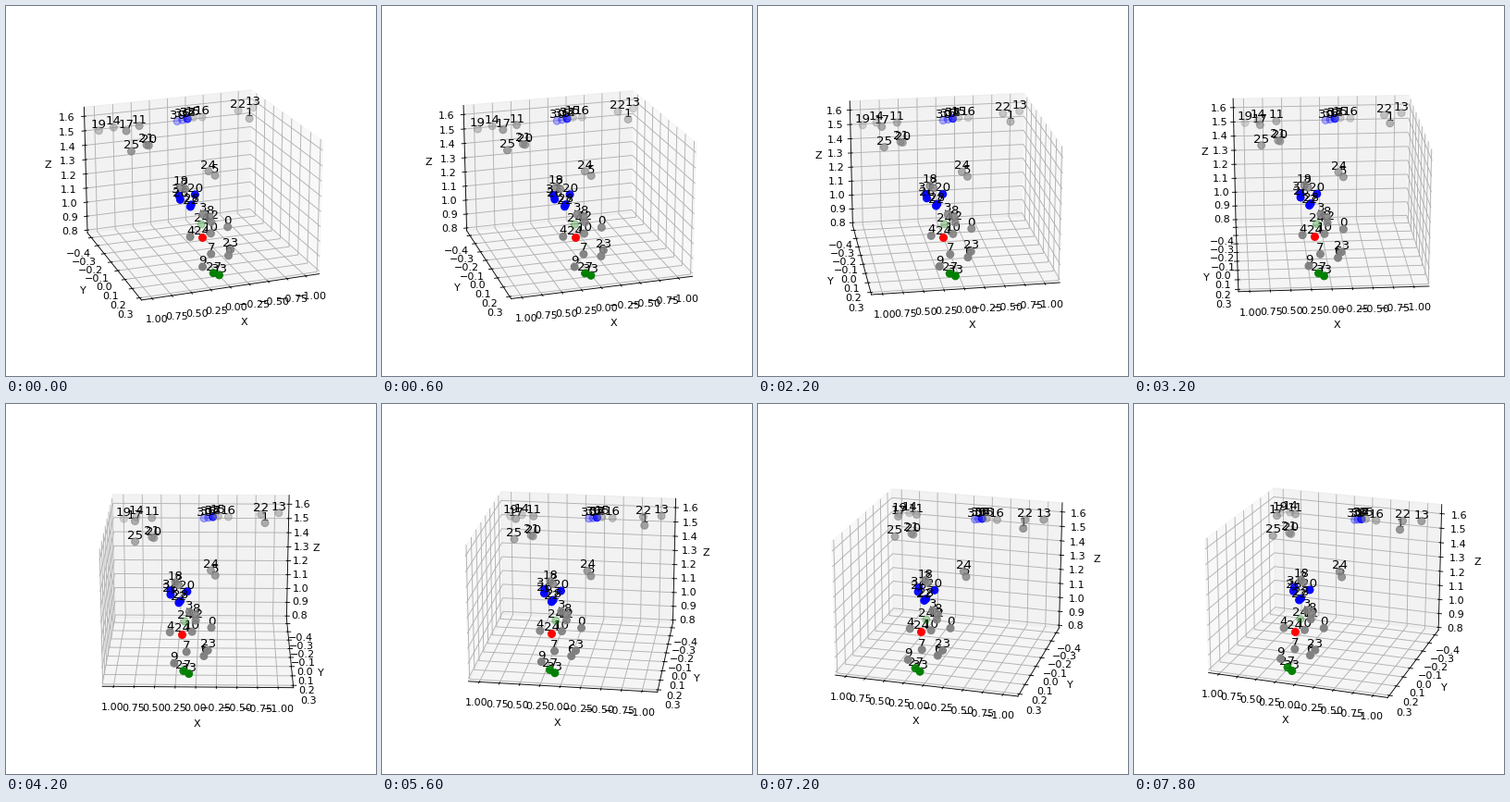
Write a matplotlib script that moves like this. It is 400x400 px and loops after 8000 ms.

```python
import numpy as np
import matplotlib.pyplot as plt
from matplotlib.animation import FuncAnimation

FRAMES, INTERVAL = 40, 200
ELEV, AZIM_START, AZIM_STEP = 20, 70, 1

# Plan coordinates are thousandths of the box; MID and SPAN give data units.
MID = np.array([-0.03, -0.073, 1.22])
SPAN = np.array([1.95, 0.6605, 0.9876])

# All points lie on one surface whose height depends on y alone.
RIDGE_Y = [-515, -450, -370, -200, -130, -26, 90, 210, 330, 525]
RIDGE_Z = [299, 337, 391, 381, 293, 105, 58, -60, -183, -389]

# Plan positions of labels 0 to 25.
GRAY = [
    (-78, 309), (-422, -196), (134, 99), (62, 234), (184, 332), (-100, 19),
    (-33, 442), (77, 423), (23, 250), (153, 476), (44, 329), (320, -266),
    (22, 275), (-517, -370), (434, -468), (-115, -438), (-183, -451),
    (428, -204), (156, 84), (522, -515), (302, -129), (315, -132),
    (-399, -340), (-57, 416), (-71, -26), (424, -117),
]
BLUE = {20: (79, 132), 22: (131, 189), 28: (122, 180), 26: (185, 148),
        31: (186, 127)}
GREEN = {24: (91, 280), 27: (94, 511), 33: (60, 524)}
RED = {24: (108, 341)}

# A short strand of blue points that piles up at its far end.
for n, label in enumerate((30, 36, 35, 32, 34)):
    t = min(n / 2, 1)
    BLUE[label] = (-19 - 60 * t, -492 + 38 * t)

fig = plt.figure(figsize=(5, 5), dpi=80)
ax = fig.add_subplot(projection="3d")


def plot_group(plan, color):
    x, y = np.array(list(plan.values())).T
    z = np.interp(y, RIDGE_Y, RIDGE_Z)
    xyz = MID + np.column_stack([x, y, z]) / 1000 * SPAN
    ax.scatter(*xyz.T, c=color, s=50)
    for label, pos in zip(plan, xyz):
        ax.text(*pos, str(label), size=12, ha="center", va="bottom")


plot_group(dict(enumerate(GRAY)), "gray")
plot_group(BLUE, "blue")
plot_group(GREEN, "green")
plot_group(RED, "red")

ax.set(xlabel="X", ylabel="Y", zlabel="Z")


def update(i):
    ax.view_init(elev=ELEV, azim=AZIM_START + AZIM_STEP * i)
    return []


anim = FuncAnimation(fig, update, frames=FRAMES, interval=INTERVAL,
                     repeat=True, repeat_delay=0)
plt.show()
```
